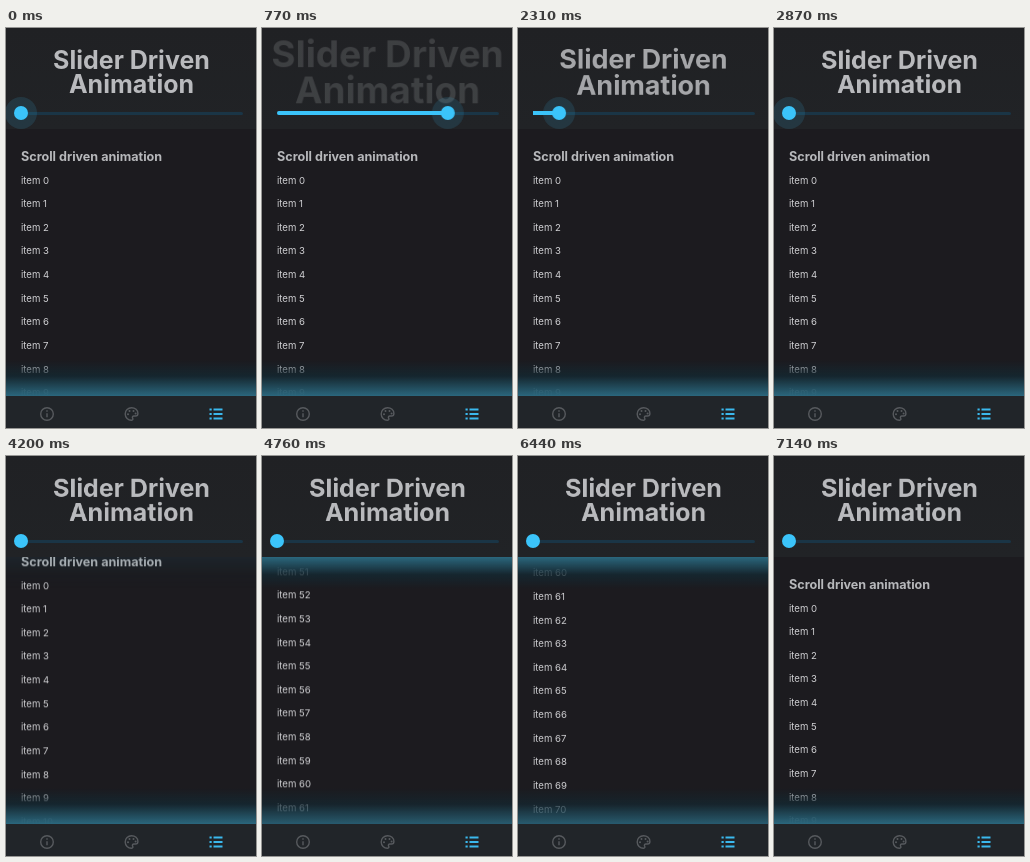
Recreate the animation shown at these times as an HTML page. Size 250x400 px, loop 7.35 s.

```html
<!DOCTYPE html>
<html lang="en">
<head>
<meta charset="utf-8">
<title>Slider and scroll animation</title>
<style>
  :root { --loop: 7350ms; --accent: #3bc4fa; --rise: cubic-bezier(.35, .1, .6, .95); }
  html, body { margin: 0; width: 100%; height: 100%; overflow: hidden; background: #1c1b1f; }
  #stage { position: absolute; width: 250px; height: 400px; overflow: hidden; font-family: Inter, Roboto, sans-serif; }
  #stage * { position: absolute; box-sizing: border-box; }

  #head { width: 250px; height: 101px; overflow: hidden; background: linear-gradient(#202124, #212326); }
  #title {
    left: 0; top: 20px; width: 251px; text-align: center; white-space: pre;
    font-size: 25px; font-weight: 700; line-height: 24px; color: #b9babd;
    animation: title var(--loop) infinite;
  }
  .bar { left: 15px; top: 83px; height: 4px; border-radius: 2px; }
  #track { width: 222px; top: 83.5px; height: 3px; background: #1a3546; }
  #fill { width: 213px; background: var(--accent); transform-origin: 0 0; animation: fill var(--loop) infinite; }
  #knob { left: 15px; top: 85px; animation: knob var(--loop) infinite; }
  #knob i { border-radius: 50%; }
  #halo { left: -16px; top: -16px; width: 32px; height: 32px; background: rgba(59, 196, 250, .13); animation: halo var(--loop) infinite; }
  #dot { left: -7px; top: -7px; width: 14px; height: 14px; background: var(--accent); }

  #view { top: 101px; width: 250px; height: 267px; overflow: hidden; background: #1c1b1f; }
  #list { left: 15px; top: 0; animation: scroll var(--loop) infinite; }
  #list * { white-space: nowrap; line-height: 20px; }
  #list b { top: 17.5px; font-size: 12.6px; color: #b7b8bb; }
  #list span { font-size: 9.6px; color: #d0d0d3; }
  .glow { left: 0; width: 250px; height: 36px; background: linear-gradient(rgba(14, 26, 32, 0), rgba(20, 41, 51, .8) 45%, #2b677d); }
  #low { bottom: 0; animation: low var(--loop) infinite; }
  #high { top: 0; height: 32px; rotate: 180deg; animation: high var(--loop) infinite; }

  #tabs { top: 368px; width: 250px; height: 32px; background: #212529; }
  #tabs svg { left: 0; top: 0; }

  @keyframes knob {
    0%, 1% { transform: none; animation-timing-function: var(--rise); }
    20%, 21.9% { transform: translateX(213px); animation-timing-function: var(--rise); }
    38.1%, 100% { transform: none; }
  }
  @keyframes fill {
    0%, 1% { transform: scaleX(0); animation-timing-function: var(--rise); }
    20%, 21.9% { transform: none; animation-timing-function: var(--rise); }
    38.1%, 100% { transform: scaleX(0); }
  }
  @keyframes title {
    0%, 1% { transform: none; opacity: 1; animation-timing-function: var(--rise); }
    20%, 21.9% { transform: scale(1.6); opacity: 0; animation-timing-function: var(--rise); }
    38.1%, 100% { transform: none; opacity: 1; }
  }
  @keyframes halo { 0%, 39.3% { opacity: 1; } 41.9%, 100% { opacity: 0; } }
  /* slow drag, flick down, rest, flick back to the top */
  @keyframes scroll {
    0%, 53.33% { transform: none; animation-timing-function: cubic-bezier(.4, 0, .8, .6); }
    57.143% { transform: translateY(-22.5px); animation-timing-function: cubic-bezier(.33, .06, .67, .1); }
    59.864% { transform: translateY(-250px); animation-timing-function: cubic-bezier(.3333, 1, .6667, 1); }
    80%, 82.857% { transform: translateY(-1996.6px); animation-timing-function: cubic-bezier(.6, 0, .9, .3); }
    86.395% { transform: translateY(-1856px); animation-timing-function: cubic-bezier(.3333, .6667, .6667, 1); }
    97.143%, 100% { transform: none; }
  }
  @keyframes high {
    0%, 55% { opacity: 0; } 57.143% { opacity: .12; } 59%, 94.6% { opacity: 1; } 97.143%, 100% { opacity: 0; }
  }
  @keyframes low { 0%, 57.2% { opacity: 1; } 60%, 94.6% { opacity: .85; } 97.143%, 100% { opacity: 1; } }
</style>
</head>
<body>
<div id="stage">
  <div id="view">
    <div id="list"><b>Scroll driven animation</b></div>
    <div id="high" class="glow"></div>
    <div id="low" class="glow"></div>
  </div>
  <div id="head">
    <div id="title">Slider Driven
Animation</div>
    <div id="track" class="bar"></div>
    <div id="fill" class="bar"></div>
    <div id="knob"><i id="halo"></i><i id="dot"></i></div>
  </div>
  <div id="tabs">
    <svg width="250" height="32" fill="none" stroke="#575a5e" stroke-width="1.4">
      <circle cx="41" cy="18" r="6.3"/>
      <path d="M41 17.2v4M41 14.2v1.5"/>
      <path d="M125.5 11.7a6.3 6.3 0 1 0 0 12.6c1.5 0 1.7-1.2 1.1-2.1-.6-1.2.1-2.2 1.3-2.2h1.6c1.5 0 2.4-1.2 2.4-2.6 0-3.2-2.8-5.7-6.4-5.7z"/>
      <path d="M122 18.2h.01M123.5 15h.01M127.5 15h.01M129.6 17.6h.01" stroke-width="2" stroke-linecap="round"/>
      <path d="M207.5 13.5h9M207.5 18h9M207.5 22.5h9M203.5 13.5h2.2M203.5 18h2.2M203.5 22.5h2.2" stroke="#3bb9ee" stroke-width="2"/>
    </svg>
  </div>
</div>
<script>
  const list = document.getElementById('list');
  const firstTop = 41.5, pitch = 23.63;
  for (let i = 0; i < 100; i++) {
    const row = document.createElement('span');
    row.textContent = 'item ' + i;
    row.style.top = firstTop + i * pitch + 'px';
    list.append(row);
  }
</script>
</body>
</html>
```
